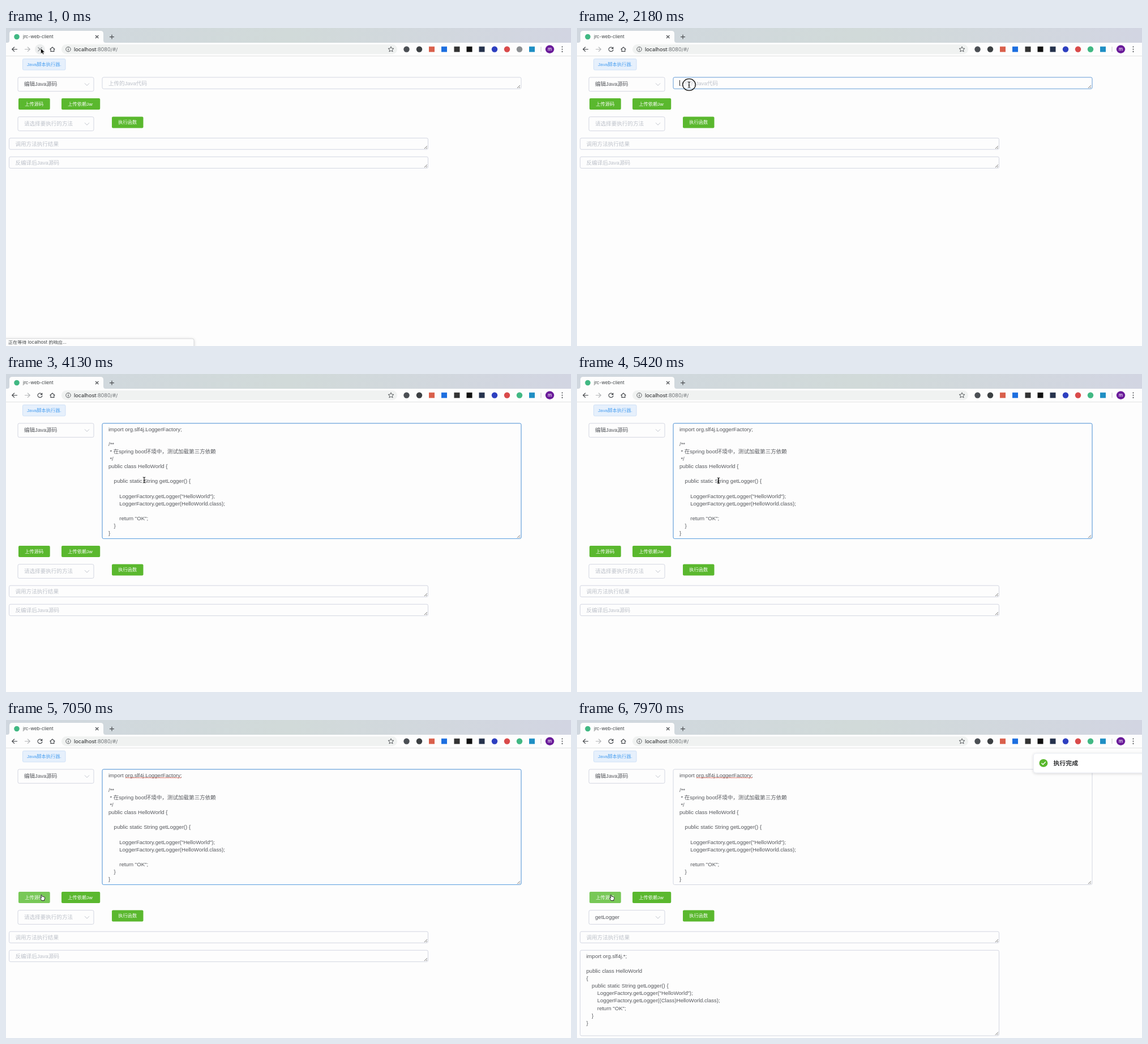
Animation of 998x561 px, one loop 8000 ms. Source, as an HTML page:

```html
<!DOCTYPE html>
<html lang="zh-CN">
<head>
<meta charset="utf-8">
<title>jrc-web-client</title>
<style>
html, body { margin: 0; width: 100%; height: 100%; overflow: hidden; background: #fdfdfd; }
svg { display: block; width: 998px; height: 561px; }
text { font: 8.75px "Liberation Sans", "Noto Sans CJK SC", "Noto Sans CJK", sans-serif; fill: #55575c; white-space: pre; }
.ui { font: 7.4px Inter, "Noto Sans CJK SC", "Noto Sans CJK", sans-serif; fill: #3c4043; }
.url { font-size: 8.4px; fill: #202124; }
.hint { fill: #bcc0c9; }
.small { font-size: 7.5px; }
.btn { fill: #fff; font-weight: 500; }
.title { font-size: 10px; font-weight: 700; fill: #303133; }
.box { fill: #fdfdfd; stroke: #d3d6e1; }
.line { fill: none; stroke: #4a4d51; stroke-width: 1.2; }
</style>
</head>
<body>
<svg id="stage" viewBox="0 0 998 561"></svg>
<script>
const LOOP = 8000, LOADED = 300, FOCUS = 2080, PASTE = 3180, CLICK = 4300,
      SPELL = 5800, PRESS = 7310, RELEASE = 7480, RESULT = 7800, NOTICE = 7815;
const GROW = 179, LEADING = 13.1;
const GREEN = '#5ab82e', HOVER = '#78c857', ACTIVE = '#4ea02b';

const source = `import org.slf4j.LoggerFactory;

/**
 * 在spring boot环境中，测试加载第三方依赖
 */
public class HelloWorld {

    public static String getLogger() {

        LoggerFactory.getLogger("HelloWorld");
        LoggerFactory.getLogger(HelloWorld.class);

        return "OK";
    }
}`;
const decompiled = `import org.slf4j.*;

public class HelloWorld
{
    public static String getLogger() {
        LoggerFactory.getLogger("HelloWorld");
        LoggerFactory.getLogger((Class)HelloWorld.class);
        return "OK";
    }
}`;

const text = (x, y, s, cls = '') =>
  `<text class="${cls}" transform="translate(${x} ${y}) scale(1.094 1)">${s}</text>`;
const lines = (x, y, s) => s.split('\n').map((l, i) => {
  const indent = l.length - l.trimStart().length;
  return text(x + indent * 2.4, y + i * LEADING, l.trim());
}).join('');
const box = (x, y, w, h, attrs = '') =>
  `<rect class="box" x="${x}" y="${y}" width="${w}" height="${h}" rx="2.5" ${attrs}/>`;
const grip = (id, x, y) =>
  `<path id="${id}" d="M${x - 6} ${y - 1}l5-5M${x - 3} ${y - 1}l2-2" stroke="#666" stroke-width=".9"/>`;
const select = (y, label) => box(21, y, 134, 24.7) + label +
  `<path d="M139 ${y + 10.5}l4 4 4-4" fill="none" stroke="#c0c4cc"/>`;
const button = (id, x, y, w, label) =>
  `<rect id="${id}" x="${x}" y="${y}" width="${w}" height="20" rx="2" fill="${GREEN}"/>` +
  text(x + 11.3, y + 12.6, label, 'small btn');
const dot = (x, color, id = '') => `<circle id="${id}" cx="${x}" cy="37.5" r="5.2" fill="${color}"/>`;
const tile = (x, color) => `<rect x="${x - 5}" y="32.7" width="10" height="9.6" fill="${color}"/>`;

const chrome = `
<rect width="998" height="27" fill="url(#strip)"/>
<path d="M0 26h2q4 0 4-4V10q0-5 5-5h156q5 0 5 5v12q0 4 4 4h822v23H0z" fill="#fdfdfd"/>
<path d="M0 49.3h998" stroke="#e2e3e3"/>
<circle cx="19" cy="15.5" r="4.8" fill="#41b883"/>
${text(30, 18.2, 'jrc-web-client', 'ui')}
<path class="line" d="M158 13l5.4 5M163.4 13l-5.4 5M183 15.6h8M187 11.8v7.6"/>
<path class="line" d="M20 37.5h-9M15 33.5l-4.3 4 4.3 4"/>
<path class="line" d="M33 37.5h9M38 33.5l4.3 4-4.3 4" style="stroke:#b5b7b9"/>
<circle id="halo" cx="60" cy="37.5" r="9" fill="#eceeee"/>
<path id="stop" class="line" d="M56.5 34l7 7M63.5 34l-7 7" style="stroke:#8d9093"/>
<g id="reload"><path class="line" d="M63.2 35.3a4 3.8 0 1 0 .8 2.8"/><path d="M64.4 33v4h-4.2z" fill="#4a4d51"/></g>
<path class="line" d="M77.5 37.8l4.4-4 4.4 4M79 37v4.3h5.8V37"/>
<rect x="98" y="29" width="593" height="17" rx="8.5" fill="#f0f2f1"/>
<circle class="line" cx="110" cy="37.5" r="4.2" style="stroke-width:.9"/>
<path class="line" d="M110 36.8v3M110 34.8v1"/>
${text(120, 40.6, 'localhost<tspan fill="#6a6e72">:8080/#/</tspan>', 'ui url')}
<path class="line" style="stroke-width:.9" d="M680 32.8l1.4 3.1 3.6.3-2.7 2.2.8 3.3-3.1-1.8-3.1 1.8.8-3.3-2.7-2.2 3.6-.3z"/>
${dot(707.5, '#4b4f54')}${dot(730, '#3c4043')}${tile(752, '#d9604c')}${tile(774, '#1d6fe0')}
${tile(796.5, '#333')}${tile(818.5, '#111')}${tile(840.5, '#26334d')}${dot(863, '#2d3fc0')}
${dot(885, '#d94a4a')}${dot(907, '#41b883', 'devtool')}${tile(929, '#1f8fc4')}
<path d="M945 33v9" stroke="#c8cacc"/>
<ellipse cx="960.5" cy="37.5" rx="7.7" ry="7.2" fill="#6a1b9a"/>
${text(957, 40, 'm', 'ui btn')}
<path d="M982.5 33.2v.1M982.5 37.4v.1M982.5 41.6v.1" stroke="#4a4d51" stroke-width="2" stroke-linecap="round"/>`;

const page = `
<rect x="29.5" y="54.5" width="75.5" height="19.5" rx="2" fill="#e6f0fc" stroke="#cfe1f7"/>
${text(37, 67, 'Java脚本执行器.', 'small').replace('<text', '<text style="fill:#4a9ff0"')}
${select(87, text(32, 102.2, '编辑Java源码'))}
${box(170, 87, 740, 20.3, 'id="area"')}
${box(170, 87, 740, 20.3, 'id="ring" style="fill:none;stroke:#5a9fe0"')}
${grip('areaGrip', 909, 107)}
<g id="hint">${text(181, 100.6, '上传的Java代码', 'hint')}</g>
<g id="code">${lines(181, 100.6, source)}</g>
<path id="spell" d="M211 101.8h99" stroke="#e0503f" stroke-width="1.2" stroke-dasharray="1.6 1"/>
<rect id="caret" width="1" height="10" fill="#222"/>
<g id="low">
  ${button('upSource', 22, 124, 55.7, '上传源码')}
  ${button('upJar', 98, 124, 68.2, '上传依赖Jar')}
  ${select(156.7, `<g id="pick">${text(32, 172.2, '请选择要执行的方法', 'hint')}</g>
    <g id="picked">${text(32, 172.2, 'getLogger')}</g>`)}
  ${button('run', 187, 156.5, 55.5, '执行函数')}
  ${box(5.5, 194.2, 740, 20)}${grip('g1', 745, 214)}
  ${text(16.5, 207.8, '调用方法执行结果', 'hint')}
  ${box(5.5, 227.2, 740, 20.2, 'id="out"')}${grip('outGrip', 745, 247)}
  <g id="outHint">${text(16.5, 240.8, '反编译后Java源码', 'hint')}</g>
  <g id="outCode">${lines(16.5, 240.8, decompiled)}</g>
</g>
<g id="status">
  <path d="M-2 548h331q3 0 3 3v12H-2z" fill="#fdfdfd" stroke="#d5d6d8" filter="url(#shade)"/>
  ${text(4, 557.4, '正在等待 localhost 的响应...', 'ui')}
</g>
<g id="notice">
  <rect y="59" width="224" height="34" rx="4" fill="#fff" stroke="#ebeef5" filter="url(#shade)"/>
  <ellipse cx="17.5" cy="76" rx="7.5" ry="7" fill="#5ab82e"/>
  <path d="M14 76l2.6 2.5 4.7-4.8" fill="none" stroke="#fff" stroke-width="1.4"/>
  ${text(35, 79.6, '执行完成', 'title')}
</g>`;

const pointer = `
<ellipse id="press" rx="11.3" ry="10.3" fill="#fff" fill-opacity=".3" stroke="#111" stroke-width="1.3"/>
<g id="pointer">
  <path id="arrow" d="M0 0V9.4L2.3 7.4 3.8 10.6 5.4 10 4 6.8H7z" fill="#000" stroke="#fff" stroke-width=".6"/>
  <path id="beam" d="M-2.2-5Q0-5 0-3.8 0-5 2.2-5M0-4V4M-2.2 5Q0 5 0 3.8 0 5 2.2 5M-1.3 1h2.6" fill="none" stroke="#111" stroke-width="1.1"/>
  <path id="hand" d="M-2.4-4.6q.9-.9 1.6.2l.7 2.6q1.2-.6 1.6.2 1.2-.4 1.5.4 1.2-.2 1.3 1.2 0 2.4-1 3.4V5h-4.6q-.8-1.9-2.6-3.6-.7-1.5.9-1.3l1.1.9z" fill="#fff" stroke="#111" stroke-width=".9"/>
</g>`;

document.getElementById('stage').innerHTML = `
<defs>
  <linearGradient id="strip"><stop stop-color="#d0d7df"/><stop offset=".5" stop-color="#d1dad9"/><stop offset="1" stop-color="#d2d5e2"/></linearGradient>
  <filter id="shade" x="-10%" y="-40%" width="120%" height="190%"><feDropShadow dx="0" dy="1.2" stdDeviation="2.5" flood-opacity=".16"/></filter>
</defs>
<rect width="998" height="561" fill="#fdfdfd"/>${page}${chrome}${pointer}`;

const $ = id => document.getElementById(id);
const show = (id, on) => { $(id).style.display = on ? '' : 'none'; };
const set = (id, name, value) => $(id).setAttribute(name, value);
const clamp = v => Math.min(1, Math.max(0, v));
const easeOut = v => 1 - (1 - clamp(v)) ** 2.3;
const within = (t, a, b) => t >= a && t < b;

// time, x, y
const path = [
  [0, 61.5, 36], [900, 61.5, 36], [1340, 128, 88.5], [1560, 128, 88.5], [2020, 198, 100],
  [3480, 198, 100], [4020, 244, 187], [4150, 244, 187], [4290, 250, 188], [5660, 250, 188],
  [6340, 109.5, 313], [6650, 109.5, 313], [7120, 61.5, 313.5], [LOOP, 61.5, 313.5]
];
function pointerAt(t) {
  const i = path.findIndex(k => k[0] > t);
  const [t0, x0, y0] = path[i - 1], [t1, x1, y1] = path[i];
  const p = (t - t0) / (t1 - t0), e = p * p * (3 - 2 * p);
  return [x0 + (x1 - x0) * e, y0 + (y1 - y0) * e];
}

function draw(t) {
  const loaded = t >= LOADED, pasted = t >= PASTE, done = t >= RESULT;
  const shift = pasted ? GROW : 0, areaHeight = pasted ? 203.5 : 20.3;
  const [x, y] = pointerAt(t);

  show('status', !loaded);
  show('stop', !loaded);
  show('reload', loaded);
  show('halo', Math.hypot(x - 60, y - 37.5) < 9);
  set('devtool', 'fill', loaded ? '#41b883' : '#8c8f92');

  set('area', 'height', areaHeight);
  set('ring', 'height', areaHeight);
  set('areaGrip', 'transform', `translate(0 ${pasted ? 183.2 : 0})`);
  set('ring', 'opacity', easeOut((t - FOCUS) / 200) - easeOut((t - PRESS) / 200));
  show('hint', !pasted);
  show('code', pasted);
  show('spell', t >= SPELL);

  const [since, cx, cy] = t < PASTE ? [FOCUS, 181, 92] : t < CLICK ? [PASTE, 184.5, 276] : [CLICK, 249.3, 183.5];
  show('caret', within(t, FOCUS, PRESS) && (t - since) % 1000 < 500);
  set('caret', 'x', cx);
  set('caret', 'y', cy);

  set('low', 'transform', `translate(0 ${shift})`);
  const inRow = within(y, 124 + shift, 144 + shift);
  const overSource = inRow && within(x, 22, 78), overJar = inRow && within(x, 98, 166);
  set('upSource', 'fill', within(t, PRESS, RELEASE) ? ACTIVE : overSource ? HOVER : GREEN);
  set('upJar', 'fill', overJar ? HOVER : GREEN);

  show('pick', !done);
  show('picked', done);
  show('outHint', !done);
  show('outCode', done);
  set('out', 'height', done ? 150.8 : 20.2);
  set('outGrip', 'transform', `translate(0 ${done ? 130.6 : 0})`);
  show('notice', t >= NOTICE);
  set('notice', 'transform', `translate(${998 - 235 * easeOut((t - NOTICE) / 300)} 0)`);

  const overArea = within(x, 170, 910) && within(y, 87, 87 + areaHeight);
  const overButton = overSource || overJar;
  show('beam', overArea);
  show('hand', overButton);
  show('arrow', !overArea && !overButton);
  set('pointer', 'transform', `translate(${x} ${y})`);
  show('press', within(t, 2100, 2260) || within(t, 4310, 4480) || within(t, 7400, RELEASE));
  set('press', 'cx', x);
  set('press', 'cy', y);
}

const start = performance.now();
function frame() {
  draw((performance.now() - start) % LOOP);
  requestAnimationFrame(frame);
}
frame();
</script>
</body>
</html>
```
